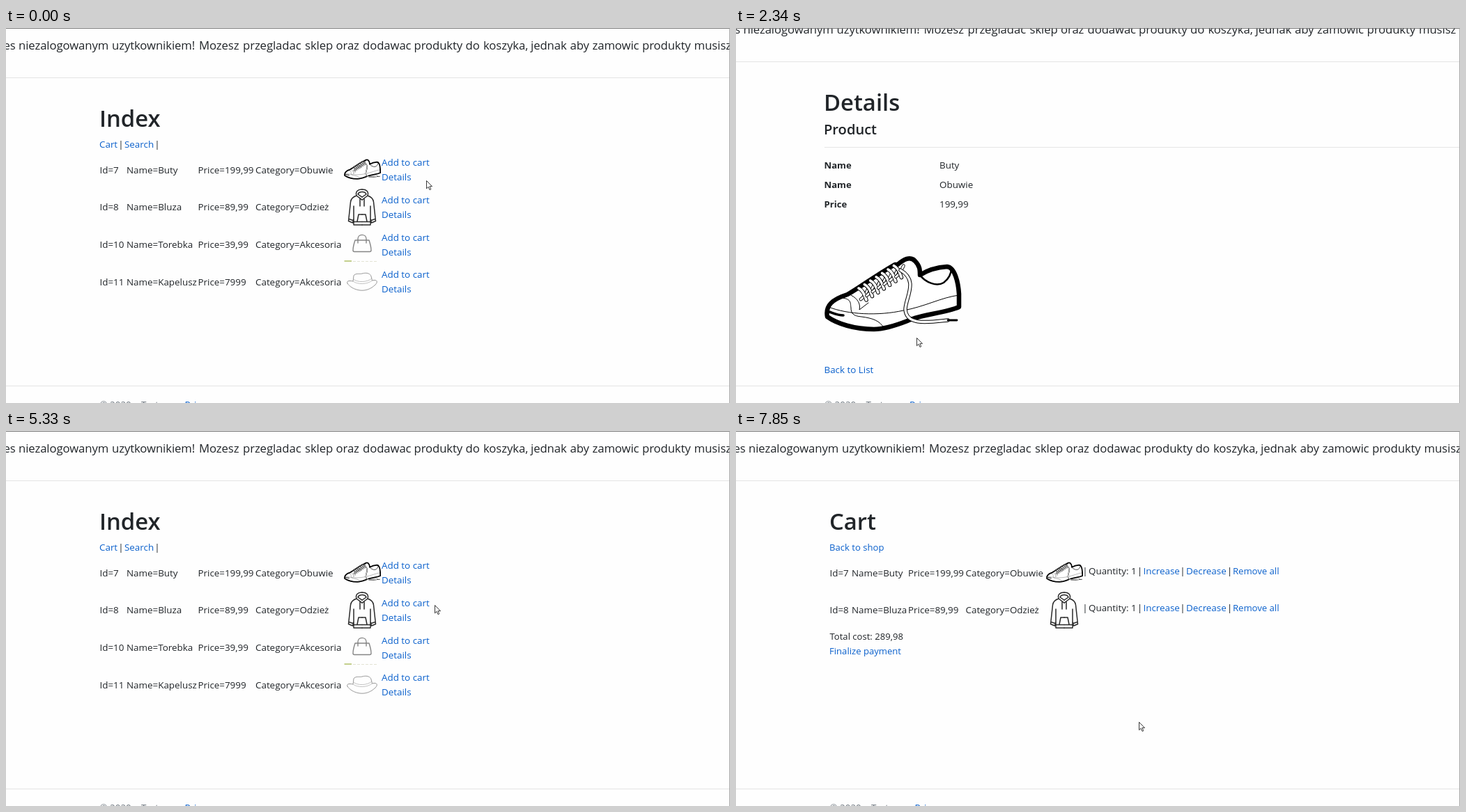
Write an HTML page that moves like this. It is 1039 by 539 pixels and loops after 8000 ms.

```html
<!DOCTYPE html>
<html lang="pl">
<head>
<meta charset="utf-8">
<title>Shop</title>
<style>
  html, body { margin: 0; width: 100%; height: 100%; overflow: hidden; background: #fefefe; }
  svg { display: block; width: 1039px; height: 539px; }
  text { font: 13.4px "Open Sans", "Noto Sans", sans-serif; fill: #212529; white-space: pre; }
  .title { font-size: 32.8px; font-weight: 600; }
  .sub { font-size: 20.1px; font-weight: 600; }
  .bold { font-size: 13.1px; font-weight: 700; }
  .notice { font-size: 16.7px; letter-spacing: -.08px; }
  .tight { font-size: 13.1px; }
  .muted { fill: #6c757d; }
  .link { fill: #0a60cc; }
  .hover { fill: #0056b3; text-decoration: underline; }
  .rule { stroke: #e5e5e5; }
  .ink { fill: none; stroke-linecap: round; stroke-linejoin: round; }
</style>
</head>
<body>
<svg id="stage" viewBox="0 0 1039 539"></svg>
<script>
const LOOP = 8000;
const stage = document.getElementById('stage');

const text = (x, y, s, cls = '') => `<text x="${x}" y="${y}" class="${cls}">${s}</text>`;
const link = (x, y, s, id = '', cls = '') =>
  `<text x="${x}" y="${y}" class="link ${cls}" data-link="${id}">${s}</text>`;
const bar = (x, y) => `<text x="${x}" y="${y}" text-anchor="middle">|</text>`;
const rule = (x, y) => `<path class="rule" d="M${x} ${y}H1060"/>`;
const ink = (d, width, color = '#000', fill = 'none') =>
  `<path class="ink" d="${d}" stroke="${color}" stroke-width="${width}" style="fill:${fill}"/>`;
const cord = (d, outer, inner) => ink(d, outer) + ink(d, inner, '#fff');
const use = (id, x, y, scale = 1) =>
  `<use href="#${id}" transform="translate(${x} ${y}) scale(${scale})"/>`;

// Drawings

function shoe() {
  let laces = '';
  for (let i = 0; i < 7; i++) {
    const x = 182 + i * 8.4, y = 403 - i * 5.4;
    laces += cord(`M${x - 3} ${y + 9}Q${x + 3} ${y + 5} ${x + 8} ${y - 7}`, 4.6, 2.8);
    laces += cord(`M${x - 6} ${y - 7}Q${x + 1} ${y - 4} ${x + 5} ${y + 10}`, 5.6, 3.6);
  }
  return ink('M131 437C128 421 138 412 160 405C178 395 195 381 228 362L232 362C240 355 250 349 257 357' +
      'C264 364 264 370 264 377C275 370 287 366 303 365C314 366 319 388 320 404L320 423' +
      'C300 432 262 434 246 443C228 450 210 455 198 455C170 455 145 447 131 437Z', 6.5, '#000', '#fff') +
    ink('M264 377C272 388 288 394 298 388C306 382 309 374 309 367', 2.6) +
    ink('M133 423C160 434 205 436 240 428C270 423 295 409 320 406', 1) +
    ink('M152 410C166 411 164 418 165 424C165 432 168 436 180 437C196 439 207 443 212 453', 1) +
    ink('M165 406C175 411 179 419 177 427L190 417', 1) +
    ink('M134 430C140 432 146 435 154 435', 3.6) +
    laces +
    cord('M236 370C262 385 244 408 243 426C244 450 275 445 304 442', 5.4, 3.4) +
    ink('M304 442H317', 2.8);
}

function hoodie() {
  const half = 'M503 241C497 243 495 246 494.5 250L491.5 277.5L497.5 280L499 274M499 256V283H511' +
    'M499 278.5H511M492 274.5L498 276.5M506 268L504 278M506 268H511M508 245V256' +
    'M511 247L503 241C501 235 505 232 511 232M511 243L505 239C506 236 508 235.5 511 235.5';
  const side = ink(half, 1.5, '#2a2a2a');
  return side + `<g transform="translate(1022) scale(-1 1)">${side}</g>`;
}

const bag = () =>
  ink('M501 305H521C523 311 524 317 524 319.5Q524 321.5 522 321.5H500Q498 321.5 498 319.5C498 317 499 311 501 305Z' +
    'M505 309V303C505 295.5 517 295.5 517 303V309', 1.4, '#858585') +
  `<path d="M485.5 335H496" stroke="#c3cf8c" stroke-width="2"/>` +
  `<path d="M498 335.5H532" stroke="#e3e3d4" stroke-dasharray="4 2"/>`;

const hat = () =>
  ink('M490 367C488 363 493 363 498 364L499 356C501 352 508 354 511 353C518 351 523 353 524 357L525.5 363' +
    'C533 361 534 365 530 369C524 375 516 378 508 377C500 376 493 372 490 367Z', 1, '#999') +
  ink('M498 364C504 369 518 369 525.5 363M498.5 361C504 366 518 366 525 360', .7, '#aaa');

// Pages

const NOTICE = ('es niezalogowanym uzytkownikiem! Mozesz przegladac sklep oraz dodawac produkty do ' +
  'koszyka, jednak aby zamowic produkty musisz').split(' ');
const NOTICE_X = [-3.5, 18, 152, 277, 340, 429, 473.5, 512, 585.5, 659.5, 685, 753, 809.5, 841.5, 913, 987.5];

const shell = footY =>
  `<text y="31" class="notice">${NOTICE.map((w, i) => `<tspan x="${NOTICE_X[i]}">${w}</tspan>`).join('')}</text>` +
  rule(-10, 71.5) + rule(-10, footY) +
  text(134.5, footY + 31.5, '© 2020 -', 'muted') + text(194, footY + 31.5, 'Testowa -', 'muted') +
  link(256.5, footY + 31.5, 'Privacy');

const GOODS = [
  ['Id=7', 'Buty', '199,99', 'Obuwie'],
  ['Id=8', 'Bluza', '89,99', 'Odzież'],
  ['Id=10', 'Torebka', '39,99', 'Akcesoria'],
  ['Id=11', 'Kapelusz', '7999', 'Akcesoria']
];
const rowY = i => 208.5 + i * 53.75;
const row = (i, xs) => {
  const [id, name, price, kind] = GOODS[i];
  return [id, 'Name=' + name, 'Price=' + price, 'Category=' + kind]
    .map((s, n) => text(xs[n], rowY(i), s)).join('');
};

const indexPage = () => shell(514.5) +
  text(134, 142, 'Index', 'title') +
  link(134, 172, 'Cart', 'cart') + bar(165, 172) + link(170, 172, 'Search') + bar(217, 172) +
  GOODS.map((_, i) => row(i, [134.5, 173, 275.5, 358]) +
    link(539, rowY(i) - 10.5, 'Add to cart', 'add' + i) +
    link(539, rowY(i) + 10.5, 'Details', 'details' + i)).join('') +
  use('shoe', 450.7, 94, .27) + use('hoodie', 0, 0) + bag() + hat();

const detailsPage = () => shell(537.5) +
  text(133.5, 142, 'Details', 'title') +
  text(133.5, 176, 'Product', 'sub') + rule(134.5, 194.5) +
  [['Name', 'Buty'], ['Name', 'Obuwie'], ['Price', '199,99']].map(([k, v], i) =>
    text(134, 225 + i * 28, k, 'bold') + text(299.5, 225 + i * 28, v)).join('') +
  use('shoe', 7.5, 1) +
  link(134, 519, 'Back to List', 'back');

const cartPage = () => shell(514.5) +
  text(134, 142, 'Cart', 'title') +
  link(134, 172, 'Back to shop', '', 'tight') +
  [0, 1].map(i => {
    const y = rowY(i) - 3;
    return row(i, [134.5, 166, 247, 329.5]) +
      bar(501, y) + text(506, y, 'Quantity: 1') + bar(579.5, y) + link(584.5, y, 'Increase') +
      bar(641, y) + link(646, y, 'Decrease') + bar(708.5, y) + link(713, y, 'Remove all', '', 'tight');
  }).join('') +
  use('shoe', 410.7, 94, .27) + use('hoodie', -40, 0) +
  text(134.5, 300, 'Total cost: 289,98', 'tight') +
  link(134, 321, 'Finalize payment', '', 'tight');

stage.innerHTML = `<defs><g id="shoe">${shoe()}</g><g id="hoodie">${hoodie()}</g></defs>
  <rect width="1039" height="539" fill="#fefefe"/>
  <g id="index">${indexPage()}</g><g id="details">${detailsPage()}</g><g id="cart">${cartPage()}</g>
  <path d="M0 .5H1039" stroke="#7d7d7d"/><path d="M1038.5 0V539" stroke="#a8a8a8"/>
  <g id="pointer">
    <path id="arrow" d="M.5 .5V11.8L3.1 9.4L5 13.6L6.8 12.8L4.9 8.7H8.5Z" fill="#fff" stroke="#222" stroke-width=".9"/>
    <path id="hand" d="M-1.2 .8Q0 -.8 1.2 .8V5.5Q2.4 4.8 3.4 6Q4.6 5.4 5.5 6.6Q7.5 6.4 7.5 8.5V11Q7.5 13 6 15H0
      Q-1 13 -4 9.5Q-4.4 7.6 -2.6 8L-1.2 9.2Z" fill="#fff" stroke="#222" stroke-width=".9"/>
  </g>`;

// Motion: bursts of pointer steps; keys are [step, x, y, link under the pointer]

const BURSTS = [
  { from: 120, to: 1160, steps: 7,
    keys: [[0, 592, 217], [1, 572, 213, 'details0'], [3, 570, 213, 'details0'], [4, 570, 215], [6, 608, 263]] },
  { from: 1300, to: 2340, steps: 8, keys: [[0, 608, 300], [2, 560, 380], [4, 400, 430], [7, 259, 445]] },
  { from: 2460, to: 3480, steps: 9,
    keys: [[0, 250, 452], [4, 185, 488, 'back'], [5, 167, 491, 'back'], [7, 167, 491, 'back'], [8, 205, 493]] },
  { from: 3630, to: 3900, steps: 3, keys: [[0, 380, 470], [1, 600, 400], [2, 724, 358]] },
  { from: 4180, to: 4620, steps: 4, keys: [[0, 671, 306], [1, 635, 240], [2, 610, 203], [3, 592, 192, 'add0']] },
  { from: 5180, to: 6110, steps: 8,
    keys: [[0, 592, 192, 'none'], [1, 615, 250], [3, 674, 381], [5, 615, 265], [6, 599, 249, 'add1'], [7, 597, 249, 'add1']] },
  { from: 6390, to: 7180, steps: 7,
    keys: [[0, 597, 249, 'none'], [1, 660, 180], [2, 698, 100], [3, 600, 86], [5, 200, 155], [6, 148, 164, 'cart']] },
  { from: 7580, to: 7850, steps: 3, keys: [[0, 300, 260], [2, 578, 418]] }
];
const PAGES = [[0, 'index'], [810, 'details'], [3480, 'index'], [7580, 'cart']];
const SCROLL = [[0, 0], [1445, 12], [1590, 22]];

const latest = (list, t) => list.filter(e => e[0] <= t).pop()[1];

function pointerAt(t) {
  const b = BURSTS.filter(e => e.from <= t).pop();
  if (!b) return { x: 603, y: 219 };
  const gap = (b.to - b.from) / (b.steps - 1);
  const step = Math.min(b.steps - 1, Math.floor((t - b.from) / gap + .01));
  const i = b.keys.filter(k => k[0] <= step).length - 1;
  const a = b.keys[i], c = b.keys[i + 1] || a;
  const u = c === a ? 0 : (step - a[0]) / (c[0] - a[0]);
  return { x: a[1] + (c[1] - a[1]) * u, y: a[2] + (c[2] - a[2]) * u, over: a[3] };
}

const part = id => document.getElementById(id);
const show = (id, on) => part(id).setAttribute('visibility', on ? 'visible' : 'hidden');
const links = [...stage.querySelectorAll('[data-link]')];

function draw(t) {
  const page = latest(PAGES, t);
  const { x, y, over } = pointerAt(t);
  for (const id of ['index', 'details', 'cart']) show(id, id === page);
  part('details').setAttribute('transform', `translate(-7.5 ${-1 - latest(SCROLL, t)})`);
  for (const el of links) el.classList.toggle('hover', !!over && el.dataset.link === over);
  const hand = !!over && over !== 'back';
  show('hand', hand);
  show('arrow', !hand);
  part('pointer').setAttribute('transform', `translate(${Math.round(x)} ${Math.round(y)})`);
}

const start = performance.now();
function tick() {
  draw((performance.now() - start) % LOOP);
  requestAnimationFrame(tick);
}
tick();
</script>
</body>
</html>
```
